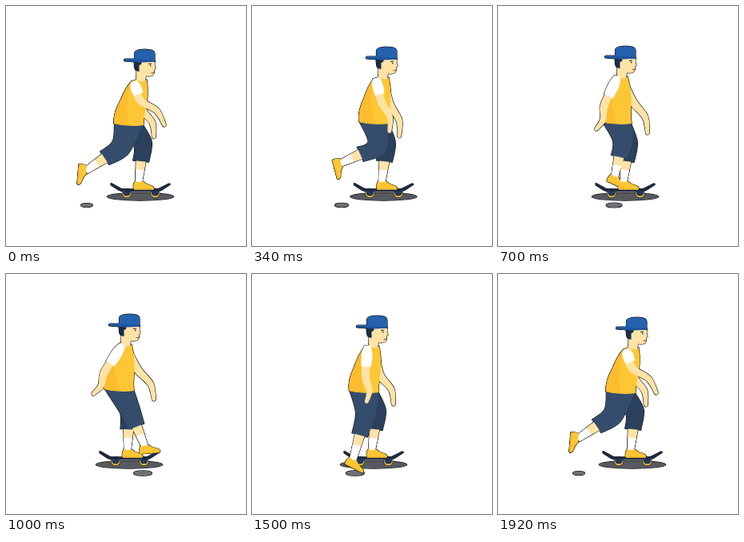
An HTML page with a canvas for the animation above (1.94 s loop, 300 px wide and 300 px high).

```html
<!DOCTYPE html>
<html lang="en">
<head>
<meta charset="utf-8">
<title>Skater</title>
<style>
html, body { margin: 0; width: 100%; height: 100%; overflow: hidden; background: #fff; }
canvas { display: block; width: 100vw; height: 100vh; }
</style>
</head>
<body>
<canvas id="stage"></canvas>
<script>
const LOOP = 1940;
const TIMES = [0, 340, 700, 1000, 1280, 1500, 1880, LOOP];
const SKIN = '#fee3a6', YELLOW = '#fdc634', AMBER = '#fbbc2d', BLUE = '#2462ae',
      NAVY = '#354d6d', DEEP = '#2b405c', DARK = '#1a2d47', INK = '#0b0b0b';

// One value per key pose; the first pose also closes the loop.
const tracks = {
  headX: [0, -5, -14, -19, -20, -17],
  headY: [0, -3, -4, -4, -4, -2],
  hipX: [0, -1, -5, -12, -14, -13.5],
  hipY: [0, -2, -2, -3, -1, -1],
  board: [0, -3.5, -9, -14, -16.5, -16],
  nearElbowX: [168, 162, 133, 123, 123, 142],
  nearElbowY: [118, 120, 124, 123, 124, 128],
  nearHandX: [198, 172, 123, 109, 111, 143],
  nearHandY: [149, 157, 154, 150, 152, 160],
  farElbowX: [170, 172, 169, 165, 162, 160],
  farElbowY: [128, 122, 120, 120, 122, 126],
  farHandX: [185, 184, 187, 185, 181, 177],
  farHandY: [164, 163, 159, 157, 159, 163],
  kickKneeX: [143, 156, 156, 155, 150, 142],
  kickKneeY: [177, 176, 168, 170, 172, 175],
  kickFootX: [101, 112, 146, 173, 159, 126.5],
  kickFootY: [205, 196, 212, 214, 227, 231],
  kickTurn: [95, 75, 25, -5, 0, 27],
  standKneeX: [171, 168, 163, 154, 154, 156],
  spotX: [101, 112, 145, 171, 165, 129],
  spotR: [7.5, 8.5, 10, 11.5, 12, 11.5]
};

const canvas = document.getElementById('stage');
const ctx = canvas.getContext('2d');
let outlining = false;

// Monotone cubic interpolation through the key poses.
function sample(values, t) {
  const v = [...values, values[0], values[0]];
  const slope = i => (v[i + 1] - v[i]) / (TIMES[i + 1] - TIMES[i]);
  const tangent = i => {
    if (i === 0 || i === TIMES.length - 1) return 0;
    const a = slope(i - 1), b = slope(i);
    return a * b <= 0 ? 0 : 2 * a * b / (a + b);
  };
  let i = 0;
  while (t >= TIMES[i + 1]) i++;
  const h = TIMES[i + 1] - TIMES[i], s = (t - TIMES[i]) / h, r = 1 - s;
  return v[i] * (1 + 2 * s) * r * r + tangent(i) * h * s * r * r
    + v[i + 1] * s * s * (3 - 2 * s) - tangent(i + 1) * h * s * s * r;
}

// The outline pass strokes every part, the next pass fills over the inner lines.
function paint(path, fill) {
  if (outlining) {
    ctx.strokeStyle = INK;
    ctx.lineWidth = 1.2;
    ctx.stroke(path);
  } else {
    ctx.fillStyle = fill;
    ctx.fill(path);
  }
}

const shape = (d, fill) => paint(new Path2D(d), fill);

function ellipse(x, y, rx, ry, fill) {
  const p = new Path2D();
  p.ellipse(x, y, rx, ry, 0, 0, Math.PI * 2);
  paint(p, fill);
}

function placed(x, y, degrees, draw) {
  ctx.save();
  ctx.translate(x, y);
  ctx.rotate(degrees * Math.PI / 180);
  draw();
  ctx.restore();
}

const mix = (a, b, k) => [a[0] + (b[0] - a[0]) * k, a[1] + (b[1] - a[1]) * k];

function direction(a, b) {
  const x = b[0] - a[0], y = b[1] - a[1], n = Math.hypot(x, y) || 1;
  return [x / n, y / n];
}

function spline(path, pts) {
  const tangent = i => {
    const a = pts[Math.max(i - 1, 0)], b = pts[Math.min(i + 1, pts.length - 1)];
    return [(b[0] - a[0]) / 6, (b[1] - a[1]) / 6];
  };
  path.lineTo(...pts[0]);
  for (let i = 1; i < pts.length; i++) {
    const [p, q] = [pts[i - 1], pts[i]], [u, v] = [tangent(i - 1), tangent(i)];
    path.bezierCurveTo(p[0] + u[0], p[1] + u[1], q[0] - v[0], q[1] - v[1], ...q);
  }
}

// Tapered band along a bent line; widths are half widths at each point.
function limb(pts, widths, fill, { tip = 0, flatTop = false } = {}) {
  const last = pts.length - 1;
  const tangents = pts.map((p, i) => {
    if (flatTop && i === 0) return [0, 1];
    const before = i ? direction(pts[i - 1], p) : [0, 0];
    const after = i < last ? direction(p, pts[i + 1]) : [0, 0];
    return direction([0, 0], [before[0] + after[0], before[1] + after[1]]);
  });
  const edge = sign => pts.map((p, i) =>
    [p[0] - tangents[i][1] * widths[i] * sign, p[1] + tangents[i][0] * widths[i] * sign]);
  const left = edge(1), right = edge(-1).reverse();
  const path = new Path2D();
  path.moveTo(...left[0]);
  spline(path, left);
  path.quadraticCurveTo(pts[last][0] + tangents[last][0] * tip * 2,
    pts[last][1] + tangents[last][1] * tip * 2, ...right[0]);
  spline(path, right);
  path.closePath();
  paint(path, fill);
}

function shoe(x, y, degrees) {
  placed(x, y, degrees, () => {
    shape('M-5 0 Q0 2 5 0 Q9 4 14 5 Q19 6 19 9.5 L18 10.5 H-6 Q-8 6 -5 0Z', YELLOW);
    shape('M-6.5 8.7 H19 L18 10.5 H-6Z', AMBER);
  });
}

function leg(hip, knee, foot, [hipWidth, kneeWidth], turn, cloth) {
  const along = k => mix(knee, foot, k);
  limb([along(0.35), along(0.6), foot], [6.5, 5.8, 4], SKIN);
  limb([along(0.7), along(0.85), along(1.04)], [5.4, 4.8, 4.2], '#fff');
  shoe(...foot, turn);
  limb([hip, knee, along(0.47)], [hipWidth, kneeWidth, 10], cloth, { flatTop: true });
}

// The wrist sits ahead of the straight forearm, so the hand droops.
function arm(shoulder, elbow, hand) {
  const [x, y] = [hand[0] - elbow[0], hand[1] - elbow[1]];
  const wrist = [elbow[0] + x * 0.55 + y * 0.13, elbow[1] + y * 0.55 - x * 0.13];
  limb([shoulder, elbow, wrist, hand], [5, 5, 3.8, 2.4], SKIN, { tip: 2 });
}

function torso(p) {
  const at = (x, y) => {
    const k = (y - 92) / 57;
    return [x + p.headX * (1 - k) + p.hipX * k, y + p.headY * (1 - k) + p.hipY * k];
  };
  const curves = (start, ...steps) => {
    const path = new Path2D();
    path.moveTo(...at(...start));
    for (const [cx, cy, x, y] of steps) path.quadraticCurveTo(...at(cx, cy), ...at(x, y));
    path.closePath();
    return path;
  };
  const back = [[134, 134, 143, 118], [150, 101, 157, 94]];
  paint(curves([163, 92], [170, 97, 176, 92], [179, 112, 174, 132],
    [172, 141, 172, 149], [153, 151.5, 135, 147], ...back), YELLOW);
  paint(curves([135, 147], ...back, [147, 122, 154, 149.3], [144, 149.5, 135, 147]), AMBER);
}

function head() {
  shape('M163 70 H186 L185.8 74 L187 78 L185.3 79.5 L185 84 Q184 89 175 87.5 L174 95 Q168 98 162 95 Q163.5 88 163 79Z', SKIN);
  shape('M160 69 H170 L169 73 L166.5 74 V82 Q161 81.5 160.5 76Z', DARK);
  shape('M178 72 L182 71.4 L182 72.4 L178 73Z', DARK);
  ellipse(180.7, 74.6, 0.8, 1, DARK);
  shape('M181 83.3 L185 82.4 L184.5 84 Q182.5 84.8 181 83.3Z', '#a85b3d');
  shape('M160.5 66 V59 Q161 55.8 166 54.8 Q173 53.6 181 54.8 Q185.8 56 186 60 V69.8 Q175 70.6 162 70 L148 68.6 Q146.5 67 149 66Z', BLUE);
  shape('M148 67.2 Q168 66.2 186 68 V69.8 Q175 70.6 162 70 L148 68.6Z', '#1f559c');
}

function board() {
  for (const x of [151, 186.5]) {
    ellipse(x, 234, 5.6, 5.2, YELLOW);
    ellipse(x, 233, 4.9, 4.6, '#24385a');
  }
  shape('M131 221.8 Q132 221.4 133 222.4 L143 227.8 Q145 228.8 148 228.8 H187 Q190 228.8 192 227.8 L203 222.2 Q205.2 221.6 205.2 223.2 L194 230.4 Q191 231.8 187 231.8 H148 Q144 231.8 141 230.2 L131 223.8Z', DARK);
}

function scene(p) {
  const point = name => [p[name + 'X'], p[name + 'Y']];
  const fromHead = (x, y) => [x + p.headX, y + p.headY];
  const fromHip = (x, y) => [x + p.hipX, y + p.hipY];

  arm(fromHead(171, 100), point('farElbow'), point('farHand'));
  placed(p.board, 0, 0, board);
  leg(fromHip(157, 148), [p.standKneeX, 172], [166 + p.board, 219], [14, 11.5], 0, DEEP);
  leg(fromHip(153.5, 147), point('kickKnee'), point('kickFoot'), [18, 12.5], p.kickTurn, NAVY);
  placed(p.headX, p.headY, 0, head);
  torso(p);

  const shoulder = fromHead(161, 98), elbow = point('nearElbow');
  const sleeve = k => mix(shoulder, elbow, k);
  arm(shoulder, elbow, point('nearHand'));
  limb([sleeve(-0.2), sleeve(0.15), sleeve(0.62)], [4, 6.8, 6.2], '#fff');
}

function draw(t) {
  const p = {};
  for (const name in tracks) p[name] = sample(tracks[name], t);
  const shadows = () => {
    ellipse(168 + p.board, 238.3, 41.7, 4.8, '#56595f');
    ellipse(p.spotX, 249, p.spotR, 1.2 + p.spotR * 0.17, '#6d7178');
  };
  ctx.clearRect(0, 0, 300, 300);
  for (const layer of [shadows, () => scene(p)]) {
    for (outlining of [true, false]) layer();
  }
}

function resize() {
  const ratio = window.devicePixelRatio || 1;
  canvas.width = Math.round(innerWidth * ratio);
  canvas.height = Math.round(innerHeight * ratio);
  ctx.setTransform(canvas.width / 300, 0, 0, canvas.height / 300, 0, 0);
  ctx.lineJoin = 'round';
}

const start = performance.now();
function frame() {
  draw((performance.now() - start) % LOOP);
  requestAnimationFrame(frame);
}

addEventListener('resize', resize);
resize();
frame();
</script>
</body>
</html>
```
